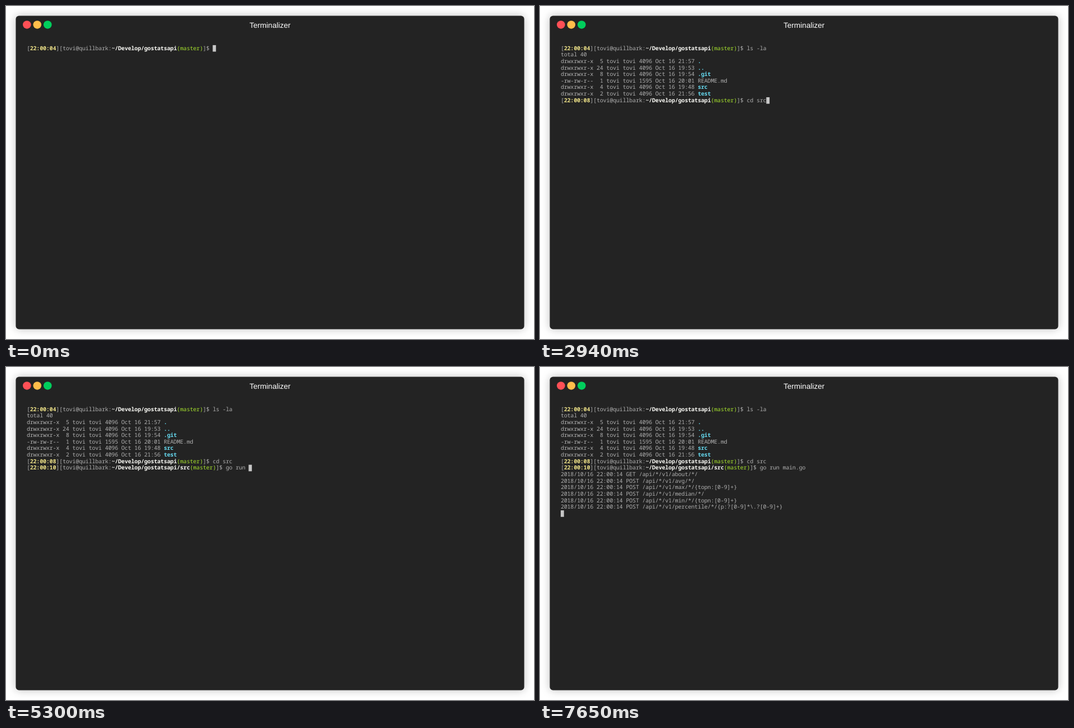
Recreate the animation shown at these times as an HTML page. Size 941 px wide and 595 px high, loop 8 s.

```html
<!DOCTYPE html>
<html lang="en">
<head>
<meta charset="utf-8">
<title>Terminal session</title>
<style>
  html, body { margin: 0; width: 100%; height: 100%; overflow: hidden; background: #fff; }
  svg { position: absolute; left: 0; top: 0; }
  .title { font: 13.57px "Liberation Sans", Arial, sans-serif; fill: #fff; text-anchor: middle; text-rendering: geometricPrecision; }
  #screen {
    position: absolute; left: 36.9px; top: 69.65px; margin: 0; color: #afafaf;
    font: 10px/11.64px "Noto Sans Mono", "DejaVu Sans Mono", monospace;
    letter-spacing: -.184px; font-variant-ligatures: none; text-rendering: geometricPrecision;
  }
  .time { color: #ebdf86; }
  .path { color: #f9f9f4; }
  .dir { color: #66d9ef; }
  .branch { color: #a6e22e; }
</style>
</head>
<body>
<svg width="941" height="595">
  <defs>
    <filter id="soft" x="-5%" y="-5%" width="110%" height="110%" color-interpolation-filters="sRGB">
      <feGaussianBlur stdDeviation="7.3"/>
    </filter>
    <rect id="window" x="17.45" y="17.45" width="906.1" height="560.1" rx="5.8"/>
  </defs>
  <use href="#window" fill-opacity=".25" filter="url(#soft)"/>
  <use href="#window" fill="#232323"/>
  <circle cx="37.3" cy="33.45" r="7.3" fill="#ff5056"/>
  <circle cx="55.7" cy="33.45" r="7.3" fill="#ffbd4a"/>
  <circle cx="74.2" cy="33.45" r="7.3" fill="#00ce5c"/>
  <text class="title" x="470.5" y="38.9">Terminalizer</text>
  <rect id="cursor" width="5.82" height="11.64" fill="#c7c7c7"/>
</svg>
<pre id="screen"></pre>
<script>
  const LOOP = 8000, CELL = 5.816, ROW = 11.64, LEFT = 36.9, TOP = 69.9;
  const USER = 'tovi', HOST = 'quillbark';
  const screen = document.getElementById('screen');
  const cursor = document.getElementById('cursor');

  const bold = (cls, text) => `<b class="${cls}">${text}</b>`;
  const prompt = (sec, sub = '') =>
    `[${bold('time', '22:00:' + sec)}][${USER}@${HOST}:` +
    bold('path', '~/Develop/gostatsapi' + sub) +
    '<span class="branch">(master)</span>]$ ';

  const entry = (mode, links, size, time, name) =>
    `${mode} ${links.padStart(2)} ${USER} ${USER} ${size} Oct 16 ${time} ${name}\n`;
  const dir = (links, time, name) =>
    entry('drwxrwxr-x', links, 4096, time, bold('dir', name));

  const listing = '\ntotal 40\n' +
    dir('5', '21:57', '.') +
    dir('24', '19:53', '..') +
    dir('8', '19:54', '.git') +
    entry('-rw-rw-r--', '1', 1595, '20:01', 'README.md') +
    dir('4', '19:48', 'src') +
    dir('2', '21:56', 'test');

  const routes = [
    'GET /api/*/v1/about/*/',
    'POST /api/*/v1/avg/*/',
    'POST /api/*/v1/max/*/{topn:[0-9]+}',
    'POST /api/*/v1/median/*/',
    'POST /api/*/v1/min/*/{topn:[0-9]+}',
    'POST /api/*/v1/percentile/*/{p:?[0-9]*\\.?[0-9]+}'
  ].map(route => `2018/10/16 22:00:14 ${route}\n`).join('');

  // Time in ms and the output added at that moment
  const steps = [
    [0, prompt('04')],
    [500, 'l'], [610, 's'], [730, ' '], [900, '-'], [1080, 'l'], [1200, 'a'],
    [1360, listing + prompt('08')],
    [1960, 'c'], [2030, 'd'], [2220, ' '], [2620, 's'], [2740, 'r'], [2940, 'c'],
    [4210, '\n' + prompt('10', '/src')],
    [4550, 'g'], [4620, 'o'], [4830, ' '], [4960, 'r'], [5030, 'u'], [5090, 'n'],
    [5300, ' '], [6180, 'm'], [6370, 'a'], [6480, 'i'], [6580, 'n'],
    [6690, '.go '],
    [7110, '\n'],
    [7650, routes]
  ];

  let shown = 0;
  function draw(count) {
    if (count === shown) return;
    shown = count;
    screen.innerHTML = steps.slice(0, count).map(step => step[1]).join('');
    const lines = screen.textContent.split('\n');
    cursor.setAttribute('x', LEFT + lines[lines.length - 1].length * CELL);
    cursor.setAttribute('y', TOP + (lines.length - 1) * ROW);
  }

  const start = performance.now();
  function tick() {
    const t = (performance.now() - start) % LOOP;
    draw(steps.filter(step => step[0] <= t).length);
    requestAnimationFrame(tick);
  }
  tick();
</script>
</body>
</html>
```
